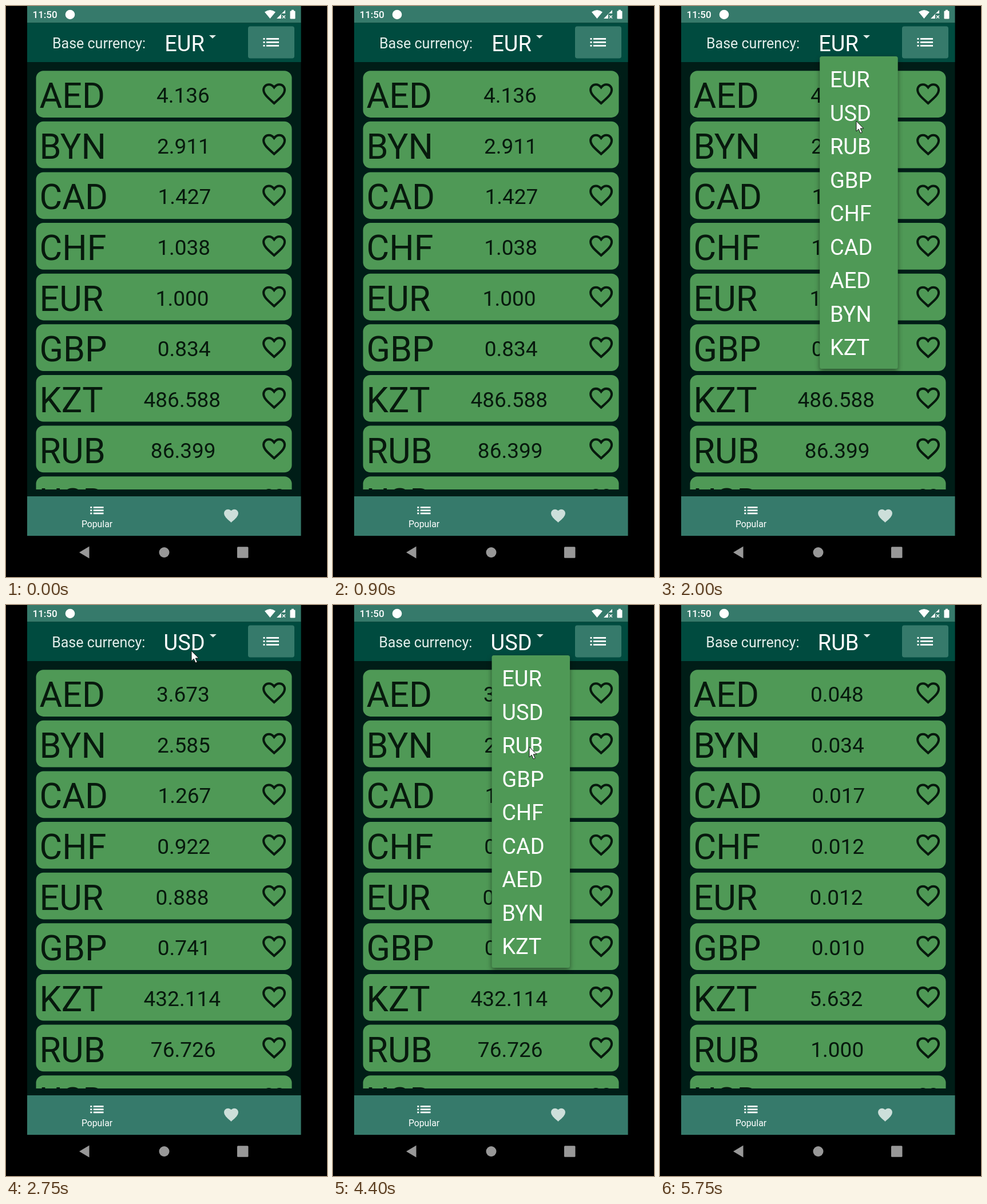
Recreate the animation shown at these times as an HTML page with a canvas. Size 561 by 998 pixels, loop 5.8 s.

```html
<!DOCTYPE html>
<html lang="en">
<head>
<meta charset="utf-8">
<title>Currency rates</title>
<style>
  html, body { margin: 0; width: 100%; height: 100%; overflow: hidden; background: #000; }
  canvas { display: block; width: 561px; height: 998px; }
</style>
</head>
<body>
<canvas id="stage" width="561" height="998"></canvas>
<script>
const ctx = document.getElementById('stage').getContext('2d');
const LOOP = 5800;
const TEAL = '#367a6b', GREEN = '#4f9956', INK = '#07190d', GREY = '#989898';
const LEFT = 37, WIDTH = 478.5;

// Units of each currency per euro; other bases follow by division
const perEuro = {
  AED: 4.136, BYN: 2.911, CAD: 1.427, CHF: 1.038, EUR: 1,
  GBP: 0.834, KZT: 486.588, RUB: 86.399, USD: 1.126065
};
const codes = Object.keys(perEuro);
const menu = 'EUR USD RUB GBP CHF CAD AED BYN KZT'.split(' ');
const picks = [{ open: 1450, close: 2330, row: 1 }, { open: 3130, close: 4650, row: 2 }];

const heart = new Path2D('M0 8C-5.8 2.9-9 .1-9-3.5-9-6-7-8-4.5-8-2.9-8-1.2-7.1 0-5.5 1.2-7.1 2.9-8 4.5-8 7-8 9-6 9-3.5 9 .1 5.8 2.9 0 8z');

const ramp = (t, from, length) => Math.max(0, Math.min(1, (t - from) / length));
const smooth = v => v * v * (3 - 2 * v);
const easeOut = v => 1 - (1 - v) ** 3;

function rect(x, y, w, h, color, r = 0) {
  ctx.fillStyle = color;
  ctx.beginPath();
  ctx.roundRect(x, y, w, h, r);
  ctx.fill();
}

function poly(color, ...pts) {
  ctx.fillStyle = color;
  ctx.beginPath();
  for (let i = 0; i < pts.length; i += 2) ctx.lineTo(pts[i], pts[i + 1]);
  ctx.closePath();
  ctx.fill();
}

function disc(x, y, r, color) {
  ctx.fillStyle = color;
  ctx.beginPath();
  ctx.arc(x, y, r, 0, 7);
  ctx.fill();
}

function text(str, x, y, size, color, align = 'left', weight = 400) {
  ctx.font = `${weight} ${size}px Roboto, sans-serif`;
  ctx.textAlign = align;
  ctx.fillStyle = color;
  ctx.fillText(str, x, y);
  return ctx.measureText(str).width;
}

function drawHeart(x, y, scale, color, filled) {
  ctx.save();
  ctx.translate(x, y);
  ctx.scale(scale, scale);
  ctx.strokeStyle = ctx.fillStyle = color;
  ctx.lineWidth = 2;
  ctx.stroke(heart);
  if (filled) ctx.fill(heart);
  ctx.restore();
}

function listIcon(x, y, w, step) {
  for (let i = 0; i < 3; i++) {
    rect(x, y + i * step, 3, 2.8, '#fff');
    rect(x + 5.5, y + i * step, w - 5.5, 2.8, '#fff');
  }
}

function statusBar() {
  rect(LEFT, 0, WIDTH, 29.5, TEAL);
  text('11:50', 46.5, 21, 17, '#fff', 'left', 500);
  disc(112, 15, 8.3, '#fff');
  // Wi-Fi fan, crossed-out signal, battery
  ctx.beginPath();
  ctx.moveTo(461.5, 22);
  ctx.lineTo(452, 10.5);
  ctx.quadraticCurveTo(461.5, 3.5, 471, 10.5);
  ctx.fill();
  poly('#fff', 473, 22, 488, 7, 488, 13, 481, 13, 481, 22);
  ctx.strokeStyle = '#fff';
  ctx.lineWidth = 1.3;
  ctx.beginPath();
  for (const s of [-1, 1]) {
    ctx.moveTo(485.5 - 2.5 * s, 16.5);
    ctx.lineTo(485.5 + 2.5 * s, 21.5);
  }
  ctx.stroke();
  rect(496.5, 8.5, 9, 14, '#fff', 1.3);
  rect(499, 6.7, 4, 3, '#fff');
}

// The free space is shared in thirds, so a wider code shifts its neighbours
function header(base, press) {
  ctx.font = '38px Roboto, sans-serif';
  const third = (ctx.measureText(base).width - ctx.measureText('EUR').width) / 3;
  const x = 277.2 - 2 * third, arrow = 361 + third;
  rect(LEFT, 29.5, WIDTH, 68.5, '#004b3f');
  text('Base currency:', 81 - third, 74, 25, '#e3eeeb');
  rect(x + 2, 39, 98.5, 49, `rgba(255,255,255,${0.27 * press})`);
  text(base, x, 78.5, 38, '#fff');
  poly('#dfebe8', arrow - 6, 51, arrow + 6, 51, arrow, 56.7);
  rect(423, 35.5, 81, 56, TEAL, 4);
  listIcon(449.5, 56, 27.5, 6);
  return x + 2;
}

function rates(base) {
  ctx.save();
  ctx.beginPath();
  ctx.rect(LEFT, 98, WIDTH, 747);
  ctx.clip();
  codes.forEach((code, i) => {
    const y = 113.2 + i * 88.62;
    rect(52.5, y, 447, 81.7, GREEN, 13);
    const w = text(code, 58.5, y + 65, 61, INK);
    const rate = (perEuro[code] / perEuro[base]).toFixed(3);
    text(rate, (504.3 + w) / 2, y + 56, 37, INK, 'center');
    drawHeart(468.6, y + 40.4, 2.05, INK);
  });
  ctx.restore();
}

function bottomBars() {
  rect(LEFT, 857, WIDTH, 69, TEAL);
  listIcon(147.3, 875, 23.2, 5.2);
  text('Popular', 159, 911, 15.8, '#fff', 'center');
  drawHeart(393.5, 891, 1.25, '#cddfda', true);
  poly(GREY, 128, 955, 145.5, 944.5, 145.5, 965.5);
  disc(276.5, 955, 9, GREY);
  rect(404, 945.3, 19.5, 19.5, GREY, 1.5);
}

function dropdown(x, t) {
  for (const { open, close } of picks) {
    const alpha = ramp(t, open, 110) - ramp(t, close, 100);
    if (alpha <= 0) continue;
    ctx.save();
    ctx.globalAlpha = alpha;
    ctx.translate(x, 88);
    ctx.scale(1, 0.9 + 0.1 * easeOut(ramp(t, open, 260)));
    ctx.shadowColor = 'rgba(0,0,0,.45)';
    ctx.shadowBlur = 9;
    ctx.shadowOffsetY = 4;
    rect(0, 0, 136.5, 546, GREEN, 3.5);
    ctx.shadowColor = 'transparent';
    menu.forEach((code, i) => text(code, 17.7, 54.3 + i * 58.5, 38, '#fff'));
    ctx.restore();
  }
}

// Rests at the selector, visits the chosen row while the menu is open
function pointer(t) {
  if (t < 1200 || t > 5200) return;
  let x = 324, y = 80;
  for (const { open, close, row } of picks) {
    const k = smooth(ramp(t, open + 200, 340)) - smooth(ramp(t, close + 90, 260));
    x += 19 * k;
    y += (75 + 47 * row - 1) * k;
  }
  ctx.save();
  ctx.translate(x, y);
  poly('#fff', 0, 0, 0, 18, 4.2, 14.2, 7.2, 21, 10.2, 19.7, 7.2, 13, 12.8, 13);
  ctx.strokeStyle = '#111';
  ctx.lineWidth = 1;
  ctx.stroke();
  ctx.restore();
}

function frame(t) {
  let base = 'EUR', press = 0;
  for (const { open, close, row } of picks) {
    if (t >= close + 80) base = menu[row];
    press += ramp(t, open - 90, 70) - ramp(t, open + 200, 200);
  }
  rect(0, 0, 561, 998, '#000');
  rect(LEFT, 0, WIDTH, 926, '#001d17');
  statusBar();
  const menuX = header(base, press);
  rates(base);
  bottomBars();
  dropdown(menuX, t);
  pointer(t);
}

const start = performance.now();
function tick() {
  frame((performance.now() - start) % LOOP);
  requestAnimationFrame(tick);
}
tick();
</script>
</body>
</html>
```
